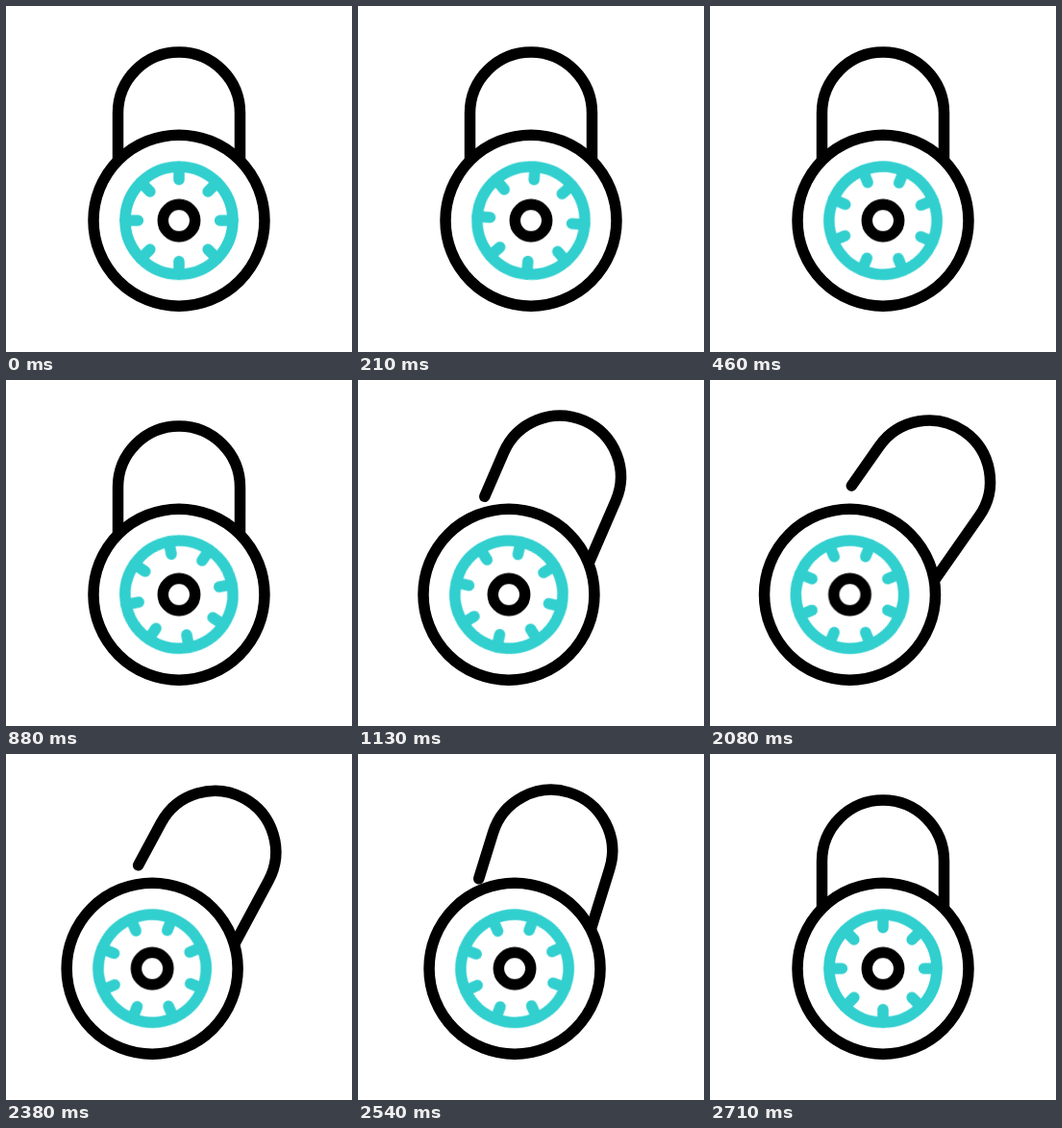
An HTML page without scripts that plays this animation: 360x360 px, repeating every 3 s.

```html
<!DOCTYPE html>
<html lang="en">
<head>
<meta charset="utf-8">
<title>Padlock</title>
<style>
  /* 0 = locked, 1 = open */
  @property --open {
    syntax: "<number>";
    inherits: true;
    initial-value: 0;
  }
  html, body {
    margin: 0;
    height: 100%;
    overflow: hidden;
    background: #fff;
  }
  svg {
    display: block;
    width: 100vw;
    height: 100vh;
    fill: none;
    stroke: #000;
    stroke-width: 11.5;
    stroke-linecap: round;
    animation: open 3s infinite;
  }
  .shackle {
    transform:
      translate(
        calc(180px + var(--open) * (38.1px + var(--open) * 9.9px)),
        calc(111.5px + var(--open) * (-37.1px + var(--open) * 31.1px)))
      rotate(calc(var(--open) * 35deg));
  }
  .body {
    transform: translate(calc(180px - var(--open) * 34.5px), 223.2px);
  }
  .case { fill: #fff; }
  .dial {
    stroke: #32cfcf;
    animation: turn 3s infinite;
  }
  @keyframes open {
    0%, 29.17% { --open: 0; animation-timing-function: cubic-bezier(.333, 0, .667, 1); }
    43.06% { --open: 1; animation-timing-function: linear; }
    70.83% { --open: 1; animation-timing-function: cubic-bezier(.333, 0, .667, .333); }
    90.28%, 100% { --open: 0; }
  }
  @keyframes turn {
    0% { transform: rotate(0deg); animation-timing-function: cubic-bezier(.45, 0, .52, 1); }
    48.61% { transform: rotate(112.5deg); animation-timing-function: linear; }
    69.2% { transform: rotate(112.5deg); animation-timing-function: cubic-bezier(.46, 0, .64, 1); }
    90.28%, 100% { transform: rotate(0deg); }
  }
</style>
</head>
<body>
<svg viewBox="0 0 360 360">
  <defs>
    <path id="tick" d="M0-56V-42.6"/>
    <g id="cross">
      <use href="#tick"/>
      <use href="#tick" transform="rotate(90)"/>
      <use href="#tick" transform="rotate(180)"/>
      <use href="#tick" transform="rotate(270)"/>
    </g>
  </defs>
  <path class="shackle" d="M-63.5 50V0A63.5 63.5 0 0 1 63.5 0V100"/>
  <g class="body">
    <circle class="case" r="89"/>
    <g class="dial">
      <circle r="56"/>
      <use href="#cross"/>
      <use href="#cross" transform="rotate(45)"/>
    </g>
    <circle r="16.7"/>
  </g>
</svg>
</body>
</html>
```
